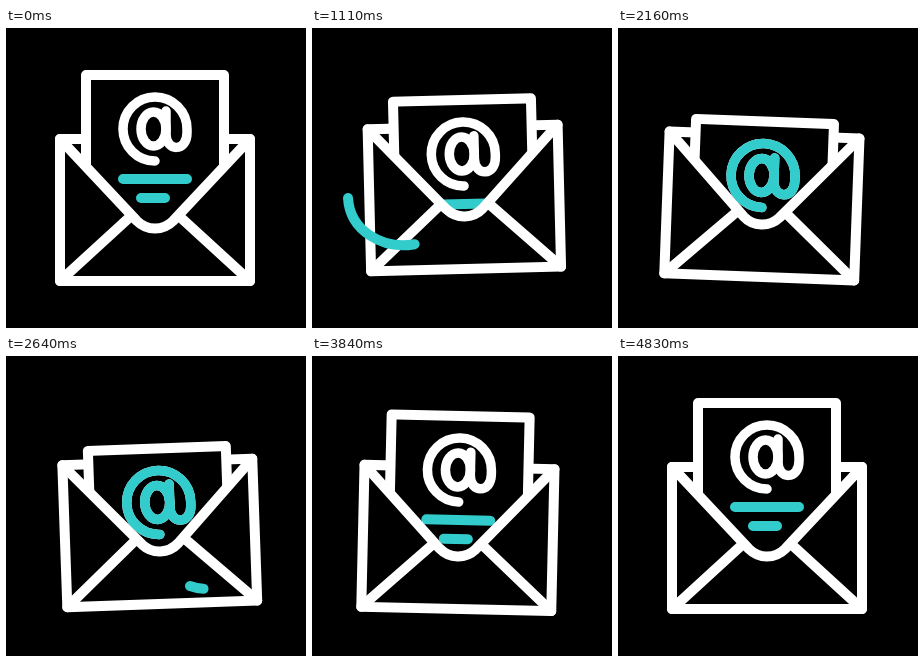
Write an HTML page that moves like this. It is 300 px wide and 300 px high and loops after 5.31 s.

```html
<!DOCTYPE html>
<html lang="en">
<head>
<meta charset="utf-8">
<title>Email</title>
<style>
  html, body { margin: 0; height: 100%; overflow: hidden; background: #000; }
  svg { display: block; width: 100vw; height: 100vh; }
  svg { fill: none; stroke: #fff; stroke-width: 10; stroke-linecap: round; stroke-linejoin: round; }
  .teal { stroke: #3cc; }
  .sign { stroke-width: 9.5; }
</style>
</head>
<body>
<svg viewBox="0 0 300 300">
  <defs>
    <clipPath id="pocket">
      <path d="M0 -60H300V111H244L167 193C157 203 141 203 131 193L54 111H0Z"/>
    </clipPath>
    <path id="ring" pathLength="1" d="M149 133A32 32 0 1 1 181 101V105C181 124 160 124 160 106V83"/>
    <ellipse id="bowl" pathLength="1" cx="147.5" cy="101" rx="12.5" ry="17"/>
  </defs>
  <g id="mail">
    <path d="M54 111H244V253H54Z"/>
    <g clip-path="url(#pocket)">
      <g class="letter">
        <path d="M80 47H218V260H80Z" fill="#000"/>
        <path class="teal" d="M117 151H181M135 170H159"/>
      </g>
    </g>
    <path d="M54 111L131 193C141 203 157 203 167 193L244 111M54 253L125 188M244 253L173 188"/>
    <g class="letter sign">
      <use href="#ring"/><use href="#bowl"/>
      <g class="teal">
        <use id="ringInk" href="#ring"/><use id="bowlInk" href="#bowl"/>
      </g>
    </g>
  </g>
  <g class="teal">
    <path id="swoop" pathLength="1" d="M36 170C38 205 75 224 108 215C135 208 147 198 155 184"/>
    <path id="flick" pathLength="1" d="M184 230C212 240 240 222 246 192"/>
    <g id="sparks" stroke-width="8"></g>
  </g>
</svg>
<script>
const LOOP = 5310, STEP = 30;
const $ = id => document.getElementById(id);
const letters = document.querySelectorAll('.letter');

// Key poses as [time, value]
const tilt = [[720, 0], [1110, -1.4], [1470, -2.8], [1710, -1.4], [1950, 2.1], [2070, 2.8], [2490, -2.8],
  [2640, -2], [3035, 0], [3270, 1.6], [3585, 2.8], [3840, 1.3], [4180, 0]];
const lift = [[360, 0], [760, -18], [1110, -12], [1410, 0], [1740, 10.5], [1980, 3], [2430, -11],
  [2640, -5], [3040, 12], [3270, 8], [3600, 2], [3840, 0], [4180, 0]];
const slide = [[760, 0], [900, 9], [1110, 37], [1420, 50.5], [3270, 50.5], [3570, 33], [3840, 13], [4180, 0]];

// Smooth curve through the keys, flat at turning points
function curve(keys, t) {
  const last = keys.length - 1;
  if (t <= keys[0][0]) return keys[0][1];
  if (t >= keys[last][0]) return keys[last][1];
  const grade = i => (keys[i + 1][1] - keys[i][1]) / (keys[i + 1][0] - keys[i][0]);
  const slope = i => {
    if (i === 0 || i === last) return 0;
    const a = grade(i - 1), b = grade(i);
    return a * b > 0 ? 2 * a * b / (a + b) : 0;
  };
  const i = keys.findIndex(k => k[0] > t) - 1;
  const [t0, v0] = keys[i], [t1, v1] = keys[i + 1];
  const d = t1 - t0, u = (t - t0) / d, s = u * u * (3 - 2 * u);
  return v0 + (v1 - v0) * s + d * u * (1 - u) * ((1 - u) * slope(i) - u * slope(i + 1));
}

const ramp = (t, from, to) => Math.min(1, Math.max(0, (t - from) / (to - from)));
const easeOut = u => 1 - (1 - u) ** 2;

function trim(el, start, end) {
  el.style.display = end > start ? '' : 'none';
  el.style.strokeDasharray = `${end - start} 3`;
  el.style.strokeDashoffset = -start;
}

function drawSparks(t) {
  const near = 17 + 17 * easeOut(ramp(t, 4440, 4830));
  const far = 17 + 17 * easeOut(ramp(t, 4260, 4560));
  let d = '';
  if (far > near) {
    for (const [x, side] of [[60, -1], [230, 1]]) {
      for (const angle of [0, Math.PI / 4, Math.PI / 2]) {
        const at = r => `${x + side * r * Math.cos(angle)} ${102 - r * Math.sin(angle)}`;
        d += `M${at(near)}L${at(far)}`;
      }
    }
  }
  $('sparks').innerHTML = `<path d="${d}"/>`;
}

function draw(t) {
  $('mail').setAttribute('transform', `translate(0 ${curve(lift, t)}) rotate(${curve(tilt, t)} 149 45)`);
  for (const el of letters) el.setAttribute('transform', `translate(0 ${curve(slide, t)})`);

  const inkStart = ramp(t, 2700, 3200), inkEnd = ramp(t, 1380, 1940);
  trim($('ringInk'), inkStart, inkEnd);
  trim($('bowlInk'), inkStart, inkEnd);
  trim($('swoop'), ramp(t, 1140, 1620), ramp(t, 720, 1380));
  trim($('flick'), ramp(t, 2640, 2910), ramp(t, 2600, 2840));
  drawSparks(t);
}

function tick() {
  const t = performance.now() % LOOP;
  draw(t - t % STEP);
  requestAnimationFrame(tick);
}
tick();
</script>
</body>
</html>
```
